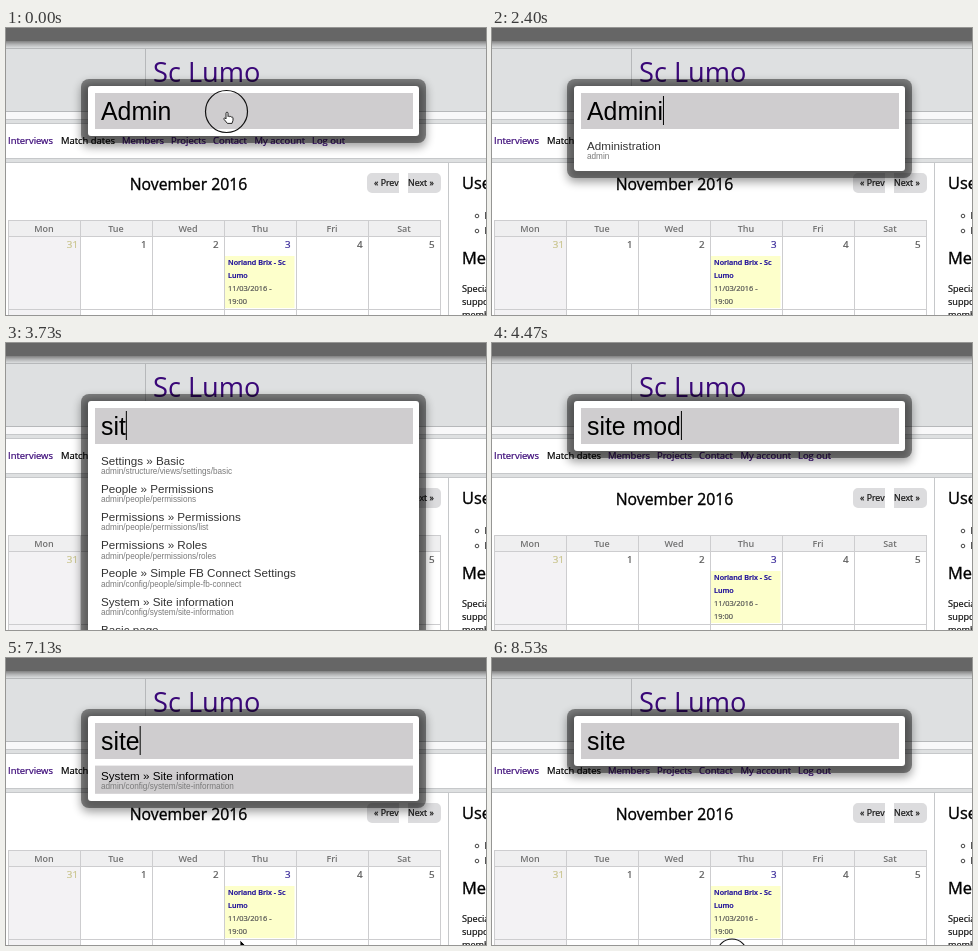
Animation, 480 px wide and 287 px high, one loop 8.59 s. Source, as an HTML page:

```html
<!DOCTYPE html>
<html lang="en">
<head>
<meta charset="utf-8">
<title>Admin quick search</title>
<style>
  html, body { margin: 0; width: 100%; height: 100%; overflow: hidden; background: #fff; }
  svg { display: block; width: 480px; height: 287px; }
  /* a hairline stroke gives the page text its slightly heavy rendering */
  text { font-family: "Open Sans", sans-serif; white-space: pre; fill: currentColor; stroke: currentColor; stroke-width: .22px; }
  .link { color: #3a0878; }
  .nav { font-size: 9.45px; }
  .site { font-size: 27.2px; stroke: none; }
  .month { font-size: 15.75px; color: #000; text-anchor: middle; stroke-width: .35px; }
  .pager { font-size: 8.8px; color: #111; }
  .head { font-size: 9px; font-weight: 600; color: #707070; text-anchor: middle; stroke: none; }
  .day { font-size: 9.8px; color: #555; text-anchor: end; }
  .event { font-size: 7.4px; color: #555; }
  .match { font-size: 7.2px; font-weight: 600; color: #1a0a98; }
  .side { font-size: 9.1px; color: #111; }
  .title { font-size: 16.4px; color: #000; stroke-width: .35px; }
  #dialog text { font-family: "Liberation Sans", Arial, sans-serif; stroke: none; }
  #query { font-size: 24.85px; }
  .name { font-size: 11.65px; color: #333; }
  .path { font-size: 8.2px; color: #7a7a7a; }
  .picked .name { color: #000; }
</style>
</head>
<body>
<svg viewBox="0 0 480 287">
  <defs>
    <filter id="soft" x="-15%" y="-50%" width="130%" height="200%"><feGaussianBlur stdDeviation="5"/></filter>
    <linearGradient id="barShade" x2="0" y2="1">
      <stop stop-color="#808080"/><stop offset=".5" stop-color="#b4b5b6"/><stop offset="1" stop-color="#dcdedf"/>
    </linearGradient>
  </defs>

  <rect width="480" height="287" fill="#fff"/>
  <rect width="480" height="13" fill="#666"/>
  <rect y="13" width="480" height="7" fill="url(#barShade)"/>
  <rect y="20" width="480" height="64" fill="#dee0e1"/>
  <path d="M0 20.5H480M0 83.5H480M139.5 20V84" stroke="#b6b8ba"/>
  <rect y="84" width="480" height="7" fill="#f8f8f9"/>
  <rect y="91" width="480" height="4" fill="#dee0e1"/>
  <rect y="130" width="480" height="4" fill="#dee0e1"/>
  <path d="M0 91.5H480M0 95.5H480M0 130.5H480M0 134.5H480M442.5 135V287" stroke="#c6c8ca"/>

  <text class="link site" x="147" y="54">Sc Lumo</text>
  <g id="nav"></g>

  <text class="month" x="182.5" y="161.5">November 2016</text>
  <path d="M393 145H366a5 5 0 0 0-5 5v10a5 5 0 0 0 5 5h27zM402 145h28a5 5 0 0 1 5 5v10a5 5 0 0 1-5 5h-28z" fill="#dcdcde"/>
  <text class="pager" x="368" y="158">« Prev</text>
  <text class="pager" x="402" y="158">Next »</text>

  <rect x="2" y="192" width="432" height="16" fill="#efeff0"/>
  <rect x="2" y="208" width="72" height="79" fill="#f3f2f4"/>
  <g id="calendar"></g>
  <path d="M2 192.5H435M2 208.5H435M2 281.5H435" stroke="#cdcdcf"/>

  <rect x="219" y="228" width="69.5" height="52" fill="#fdffcb"/>
  <text class="match" x="222" y="237">Norland Brix - Sc</text>
  <text class="match" x="222" y="250">Lumo</text>
  <text class="event" x="222" y="263">11/03/2016 -</text>
  <text class="event" x="222" y="276">19:00</text>

  <text class="title" x="456" y="161">User</text>
  <text class="title" x="456" y="236">Menu</text>
  <g fill="none" stroke="#333" stroke-width=".9">
    <circle cx="471" cy="188" r="1.8"/><circle cx="471" cy="203" r="1.8"/>
  </g>
  <g class="side">
    <text x="478.5" y="191">L</text><text x="478.5" y="206">R</text>
    <text x="456" y="264">Special</text>
    <text x="456" y="277">support</text>
    <text x="456" y="290">members</text>
  </g>

  <g id="dialog">
    <rect class="grow" x="75" y="55" width="345" rx="8" opacity=".38" filter="url(#soft)"/>
    <rect class="grow" x="75" y="51" width="345" rx="8" opacity=".42"/>
    <rect class="grow" x="82" y="58" width="331" rx="3" fill="#fff"/>
    <rect x="89" y="65" width="318" height="36" fill="#cfcdcf"/>
    <text id="query" x="95" y="91.5"></text>
    <rect id="caret" y="68" width="1" height="29"/>
    <g id="rows"></g>
  </g>

  <g id="hand" transform="translate(217 84)">
    <path d="M3 1.2c0-1.4 2-1.4 2 0v3.4c.4-.8 1.7-.6 1.8.2.5-.6 1.6-.3 1.7.4.6-.4 1.5 0 1.5.8v2.3L9 11.4H4.4L1 7.3c-.5-1 .7-1.8 1.4-1L3 7z" fill="#fff" stroke="#111" stroke-width=".9"/>
  </g>
  <path id="arrow" d="M0 0V12L2.8 9.4 4.6 13.4 6.6 12.5 4.8 8.6H8.6Z" stroke="#fff" stroke-width=".8"/>
  <circle id="ring" fill="none" stroke="#111" stroke-width="1.2"/>
</svg>

<script>
const LOOP = 8590, ROW = 28.2;
const $ = id => document.getElementById(id);
const label = (cls, x, y, s) => `<text class="${cls}" x="${x}" y="${y}">${s}</text>`;

$('nav').innerHTML = [
  [2, 'Interviews'], [55, 'Match dates'], [116, 'Members'], [165, 'Projects'],
  [207, 'Contact'], [248.5, 'My account'], [306, 'Log out']
].map(([x, s]) => label(s === 'Match dates' ? 'nav' : 'nav link', x, 116, s)).join('');

const dates = ['31', '1', '2', '3', '4', '5'];
const dateColor = { 31: '#c9c48c', 3: '#3a2a9a' };
$('calendar').innerHTML = ['Mon', 'Tue', 'Wed', 'Thu', 'Fri', 'Sat'].map((d, i) => {
  const x = 2 + 72 * i, end = i ? x + 66.5 : 72;
  return label('head', x + 36, 204, d) +
    `<text class="day" x="${end}" y="220" style="color:${dateColor[dates[i]] || '#555'}">${dates[i]}</text>` +
    `<path d="M${x + .5} 192V287" stroke="#cdcdcf"/>`;
}).join('') + '<path d="M434.5 192V287" stroke="#cdcdcf"/>';

const admin = [['Administration', 'admin']];
const site = [['System » Site information', 'admin/config/system/site-information']];
const many = [
  ['Settings » Basic', 'admin/structure/views/settings/basic'],
  ['People » Permissions', 'admin/people/permissions'],
  ['Permissions » Permissions', 'admin/people/permissions/list'],
  ['Permissions » Roles', 'admin/people/permissions/roles'],
  ['People » Simple FB Connect Settings', 'admin/config/people/simple-fb-connect'],
  site[0],
  ['Basic page', 'node/add/page']
];

// [start time, value]
const typing = [
  [0, 'Admin'], [200, 'Admin'], [1330, 'Admini'],
  [2730, 'Admin'], [2870, 'Admi'], [3000, 'Adm'], [3130, 'Ad'], [3260, 'A'], [3390, ''],
  [3530, 's'], [3630, 'si'], [3720, 'sit'], [3870, 'site'], [4000, 'site '],
  [4130, 'site m'], [4260, 'site mo'], [4390, 'site mod'],
  [4600, 'site mo'], [4720, 'site m'], [4870, 'site '], [5010, 'site']
];
const lists = [
  [0, []], [1470, admin], [3600, many], [3990, site], [4260, []], [5200, site], [7800, []]
];
const at = (steps, t) => steps.findLast(s => s[0] <= t);
const show = (el, on) => el.setAttribute('visibility', on ? 'visible' : 'hidden');
const clamp = v => Math.max(0, Math.min(1, v));

let drawn = '';
function drawList(list, picked) {
  const key = list.length + (list[0] || '') + picked;
  if (key === drawn) return;
  drawn = key;
  const extra = list.length ? 6.8 + ROW * list.length : 0;
  document.querySelectorAll('.grow').forEach((r, i) =>
    r.setAttribute('height', (i < 2 ? 64 : 50) + extra));
  $('rows').setAttribute('class', picked ? 'picked' : '');
  $('rows').innerHTML = (picked ? `<rect x="89" y="107.6" width="318" height="${ROW}" fill="#cfcdcf"/>` : '') +
    list.map(([name, path], i) =>
      label('name', 95, 121.6 + ROW * i, name) + label('path', 95, 131 + ROW * i, path)).join('');
}

function drawRing(x, y, r, alpha) {
  const ring = $('ring');
  ring.setAttribute('cx', x);
  ring.setAttribute('cy', y);
  ring.setAttribute('r', r);
  ring.setAttribute('opacity', alpha);
}

function frame(now) {
  const t = now % LOOP;
  const [since, text] = at(typing, t);
  const query = $('query');
  if (query.textContent !== text) query.textContent = text;

  // the caret stays solid after a key, then blinks every half second
  show($('caret'), t >= 200 && Math.floor((t - since) / 500) % 2 === 0);
  $('caret').setAttribute('x', 95 + (text ? query.getComputedTextLength() : 0));

  const list = at(lists, t)[1];
  drawList(list, t >= 7130 && list.length > 0);

  show($('hand'), t < 670);
  show($('arrow'), t >= 7125);
  const p = clamp((t - 7200) / 400);
  $('arrow').setAttribute('transform', `translate(${234 + 4 * p} ${282 + 8 * p})`);

  if (t < 330) drawRing(220.5, 83.5, 21, 1 - clamp((t - 70) / 260));
  else drawRing(240, 296, 15 * clamp((t - 8400) / 120), t > 8400 ? 1 : 0);

  requestAnimationFrame(frame);
}
requestAnimationFrame(frame);
</script>
</body>
</html>
```
